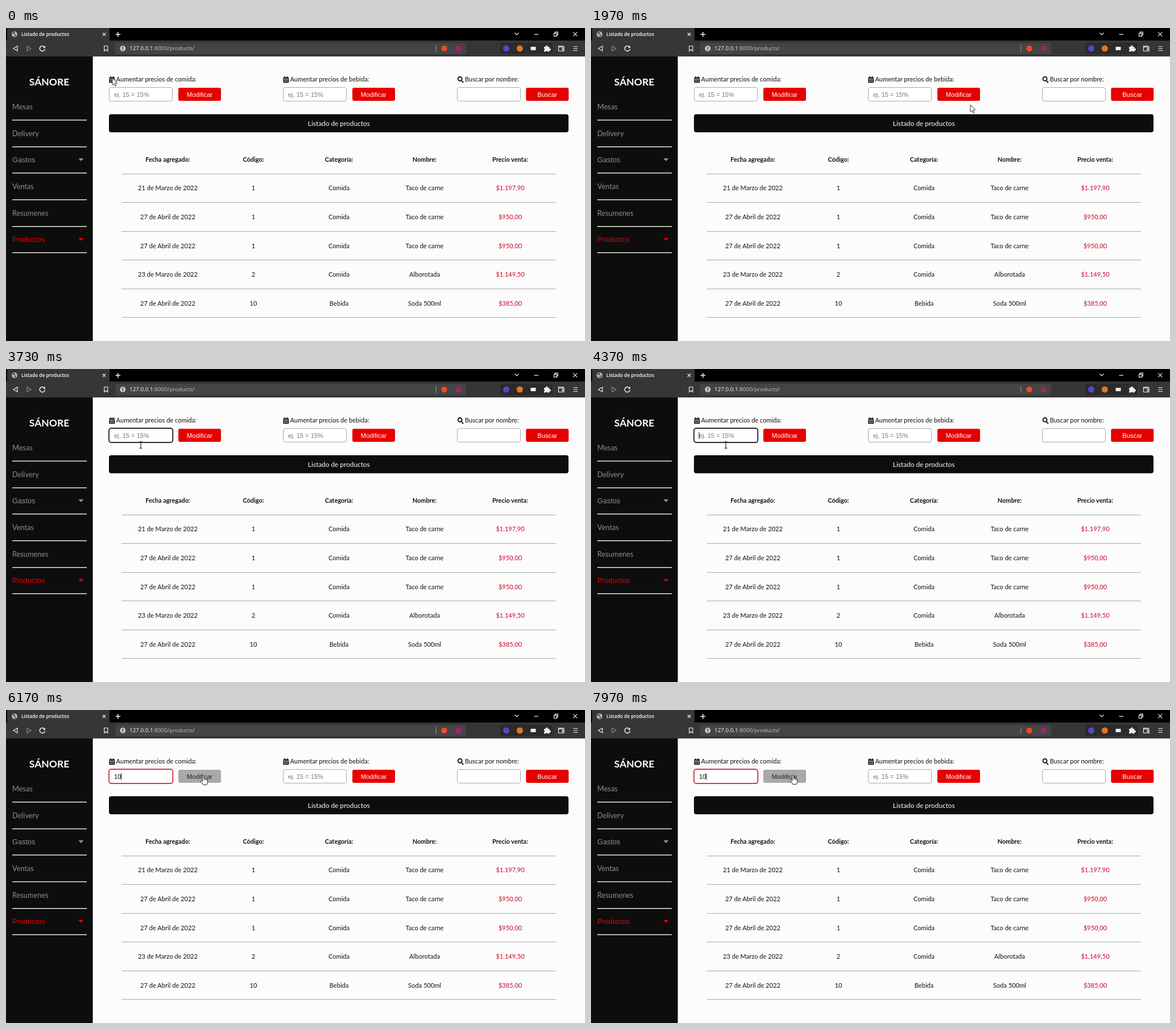
An HTML page for the animation above (8 s loop, 1018 by 550 pixels).

```html
<!DOCTYPE html>
<html lang="es">
<head>
<meta charset="utf-8">
<title>Listado de productos</title>
<style>
html, body { margin: 0; width: 100%; height: 100%; overflow: hidden; background: #fcfcfc; }
svg { display: block; width: 100%; height: 100%; }
text { font-family: Lato, sans-serif; font-size: 11.1px; white-space: pre; }
.ui { font-family: "Open Sans", "Noto Sans", sans-serif; }
.form { font-family: "Liberation Sans", Arial, sans-serif; }
.mid { text-anchor: middle; }
.semi { font-weight: 600; }
.bold { font-weight: 700; }
.line { fill: none; stroke: #eee; stroke-width: 1.2; }
</style>
</head>
<body>
<svg id="stage" viewBox="0 0 1018 550"></svg>
<script>
const stage = document.getElementById('stage');
const LOOP = 8000, RED = '#e60000', INK = '#111';

const rect = (x, y, w, h, fill, r = 0, more = '') =>
  `<rect x="${x}" y="${y}" width="${w}" height="${h}" rx="${r}" fill="${fill}" ${more}/>`;
const dot = (x, y, r, fill) => `<circle cx="${x}" cy="${y}" r="${r}" fill="${fill}"/>`;
const text = (x, y, s, fill = INK, cls = '', size = 11.1, more = '') =>
  `<text x="${x}" y="${y}" fill="${fill}" class="${cls}" style="font-size:${size}px" ${more}>${s}</text>`;
const line = (d, more = '') => `<path class="line" d="${d}" ${more}/>`;
const shape = (d, fill, more = '') => `<path d="${d}" fill="${fill}" ${more}/>`;

function browser() {
  let s = rect(0, 0, 1018, 50, '#000') + rect(2, 0, 180, 23, '#363636') + rect(0, 22, 1018, 28, '#363636');
  // tab
  s += dot(15, 11, 5, '#b5b5b5') + shape('M12 8l3-1 1 2-2 2-2-1zM15 12l3-1-1 3-2 1z', '#444');
  s += text(27, 14.3, 'Listado de productos', '#fff', 'ui semi', 8.3);
  s += line('M169.8 8.5l5.4 5.4m0-5.4l-5.4 5.4') + line('M192.5 11.2h8.6m-4.3-4.3v8.6', 'style="stroke-width:1.6"');
  // window controls
  s += line('M894.5 8.5l3.5 3.5 3.5-3.5M928.5 11.2h7.5M997.2 7.3l7 7m0-7l-7 7');
  s += line('M963.5 9.3h5v5h-5zM965.3 9v-1.8h5v5h-1.6');
  // toolbar
  s += line('M20 31.8v8.4l-7-4.2z') + line('M37 31.8v8.4l7-4.2z', 'style="stroke:#888"');
  s += line('M67.4 33a4.6 4.6 0 1 0 1 4', 'style="stroke-width:1.5"') + shape('M69 31v4h-4z', '#eee');
  s += line('M172.8 31.5h6v9l-3-2.4-3 2.4z');
  s += rect(192, 26, 617, 20, '#444', 3);
  s += dot(205.3, 36, 5, '#c4c4c4') + rect(204.6, 33, 1.4, 3.7, '#333') + rect(204.6, 37.6, 1.4, 1.4, '#333');
  s += text(217, 39.4, '127.0.0.1<tspan fill="#c6c6c6">:8000/products/</tspan>', '#fff', 'ui', 9.86);
  s += rect(755.4, 30, 1, 12, '#999') + dot(770.5, 36, 5.2, '#f0482b') + rect(791.5, 32, 8.5, 8.5, '#a3216e');
  s += rect(869, 26, 92, 20, '#2b2b2b', 3);
  s += dot(879.5, 36, 5.5, '#5646c8') + dot(903.3, 36, 5.5, '#e27625') + rect(922.5, 33, 9, 6, '#eee');
  s += shape('M946 33h3a1.8 1.8 0 1 1 3.4 0h3v3a1.8 1.8 0 1 1 0 3.2v2.3h-3.2a1.7 1.7 0 0 0-3.2 0h-3v-2.5a1.8 1.8 0 0 0 0-3.2z', '#eee');
  s += line('M980 33.4v-1.6h-8.5v8.7h9.5v-7h-9.5M981 35.8h-3.2v2.6h3.2');
  s += line('M997.5 32.5h7.5m-7.5 3.5h7.5m-7.5 3.5h7.5');
  return s;
}

function sidebar() {
  const items = [['Mesas', 143], ['Delivery', 190], ['Gastos', 235.5], ['Ventas', 283], ['Resumenes', 330], ['Productos', 375.5]];
  let s = rect(0, 50, 152.6, 500, '#0d0d0d') + text(76, 100.7, 'SÁNORE', '#fff', 'mid bold', 17.5);
  items.forEach(([name, y], i) => {
    const menu = i === 2 || i === 5, color = i === 5 ? RED : '#8b9094';
    s += text(11, y, name, color, menu ? 'form' : '', 12.75);
    if (menu) s += shape(`M127.3 ${y - 6.5}h9.2l-4.6 5z`, color);
    s += rect(11, Math.round(161 + 46.68 * i), 131, 1.5, '#e9e9df');
  });
  return s;
}

function calendar(x) {
  let s = rect(x, 86.5, 10, 9.8, INK, 1) + rect(x + 2, 85, 1.5, 3, INK) + rect(x + 6.5, 85, 1.5, 3, INK);
  s += rect(x, 88.6, 10, 0.7, '#fcfcfc');
  for (let i = 0; i < 6; i++) s += rect(x + 1.6 + 2.6 * (i % 3), 90.4 + 2.7 * Math.floor(i / 3), 1.5, 1.5, '#fcfcfc');
  return s;
}

const field = x => rect(x + .5, 104.5, 111, 24, '#fff', 3.5, 'stroke="#aaa"');
const button = (x, label, more = '', labelMore = '') =>
  rect(x, 105, 75, 23, RED, 3, more) + text(x + 37.4, 120.8, label, '#fff', 'form mid', 11.2, labelMore);

function page() {
  const hint = 'ej. 15 = 15%';
  let s = calendar(181.3) + text(193.6, 94.4, 'Aumentar precios de comida:');
  s += field(181) + rect(181, 104.2, 112.3, 24.9, '#fff', 4, 'id="ring" stroke-width="1.7"');
  s += text(189.9, 120.8, hint, '#777', 'form', 11.1, 'id="entry"') + rect(201.9, 111.2, 1, 11.6, '#000', 0, 'id="caret"');
  s += button(303, 'Modificar', 'id="modify"', 'id="modifyText"');
  s += calendar(487.3) + text(499.5, 94.4, 'Aumentar precios de bebida:');
  s += field(487) + text(495.9, 120.8, hint, '#777', 'form') + button(609, 'Modificar');
  s += line('M801 93l3 3M801.6 89.3a3.5 3.5 0 1 1-7 0a3.5 3.5 0 1 1 7 0', 'style="stroke:#111;stroke-width:1.9"');
  s += text(806.8, 94.4, 'Buscar por nombre:') + field(793) + button(914.3, 'Buscar');
  s += rect(181, 151.5, 808, 31.8, '#0d0d0d', 4) + text(585.3, 172.2, 'Listado de productos', '#fff', 'mid', 11.85);

  const columns = [284.5, 435, 585.5, 736, 886.5];
  const rows = [
    ['Fecha agregado:', 'Código:', 'Categoría:', 'Nombre:', 'Precio venta:'],
    ['21 de Marzo de 2022', '1', 'Comida', 'Taco de carne', '$1.197,90'],
    ['27 de Abril de 2022', '1', 'Comida', 'Taco de carne', '$950,00'],
    ['27 de Abril de 2022', '1', 'Comida', 'Taco de carne', '$950,00'],
    ['23 de Marzo de 2022', '2', 'Comida', 'Alborotada', '$1.149,50'],
    ['27 de Abril de 2022', '10', 'Bebida', 'Soda 500ml', '$385,00']
  ];
  rows.forEach((row, r) => {
    row.forEach((cell, c) => {
      s += text(columns[c], 234.7 + 50.65 * r, cell, r && c === 4 ? '#c9082a' : INK, r ? 'mid' : 'mid bold', r ? 11.1 : 10.9);
    });
    s += rect(203.5, Math.round(255.5 + 50.55 * r), 763.5, 1, '#a8a8b0');
  });
  return s;
}

// each pointer is drawn around its hot spot
const pointers = {
  arrow: shape('M0 0V12.3L2.9 9.6 4.8 14 6.8 13.1 4.9 8.9H8.8z', '#fff', 'stroke="#222" stroke-width=".9"'),
  beam: line('M-2.3 .8H-.6L0 1.4 .6 .8H2.3M0 1.2V11.6M-2.3 12.1H-.6L0 11.5 .6 12.1H2.3', 'style="stroke:#222;stroke-width:1.1"'),
  hand: shape('M-1 10V.8Q-1-.6 .2-.6T1.5 .8V5.3Q2.8 4.4 3.9 5.8 5.2 5 6.2 6.5 7.8 6 7.8 8V11.5Q7.8 13.5 6.3 16H0Q-1.2 13.4-4 10.2-4.8 8.8-3.5 8.2-2.3 8-1 10z',
    '#fff', 'stroke="#222" stroke-width="1"') + line('M1.5 5.3V8.4M3.9 5.8V8.6M6.2 6.5V8.8', 'style="stroke:#222;stroke-width:.7"')
};

stage.innerHTML = rect(0, 0, 1018, 550, '#fcfcfc') + browser() + sidebar() + page() +
  '<g id="pointer">' + Object.entries(pointers).map(([id, s]) => `<g id="${id}">${s}</g>`).join('') + '</g>';

const get = id => document.getElementById(id);
const set = (id, attrs) => { for (const k in attrs) get(id).setAttribute(k, attrs[k]); };
const show = (id, on) => set(id, { visibility: on ? 'visible' : 'hidden' });

// time, x, y of the pointer
const path = [
  [0, 187, 88], [250, 230, 135], [1050, 790, 135], [1700, 790, 135], [2600, 224, 135], [2950, 224, 135],
  [3180, 237, 118], [3300, 237, 118], [3550, 237, 127], [5500, 237, 127], [6300, 354.8, 114.5], [LOOP, 354.8, 114.5]
];
const FOCUS = 3200, FIRST_KEY = 4400, SECOND_KEY = 4700;

function pointerAt(t) {
  const i = path.findIndex(p => p[0] > t), [t0, x0, y0] = path[i - 1], [t1, x1, y1] = path[i];
  const u = (t - t0) / (t1 - t0), e = u * u * (3 - 2 * u);
  return [x0 + (x1 - x0) * e, y0 + (y1 - y0) * e];
}

function draw(t) {
  const [x, y] = pointerAt(t);
  const inRow = y > 104.5 && y < 129;
  const onField = inRow && x > 181 && x < 293, onButton = inRow && x > 303 && x < 378;
  const kind = onField ? 'beam' : onButton ? 'hand' : 'arrow';
  set('pointer', { transform: `translate(${x.toFixed(1)} ${y.toFixed(1)})` });
  for (const id in pointers) show(id, id === kind);

  const focused = t >= FOCUS, typed = t >= FIRST_KEY;
  const value = t >= SECOND_KEY ? '10' : typed ? '1' : '';
  show('ring', focused);
  set('ring', { stroke: typed ? '#cc2036' : '#101010' });
  get('entry').textContent = value || 'ej. 15 = 15%';
  set('entry', { fill: typed ? INK : '#777' });

  const since = [FOCUS, FIRST_KEY, SECOND_KEY][value.length];
  set('caret', { x: 189.6 + 6.2 * value.length });
  show('caret', focused && (t - since) % 1000 < 500);
  set('modify', { fill: onButton ? '#a9a9a9' : RED });
  set('modifyText', { fill: onButton ? '#222' : '#fff' });
}

const start = performance.now();
function tick() {
  draw((performance.now() - start) % LOOP);
  requestAnimationFrame(tick);
}
tick();
</script>
</body>
</html>
```
